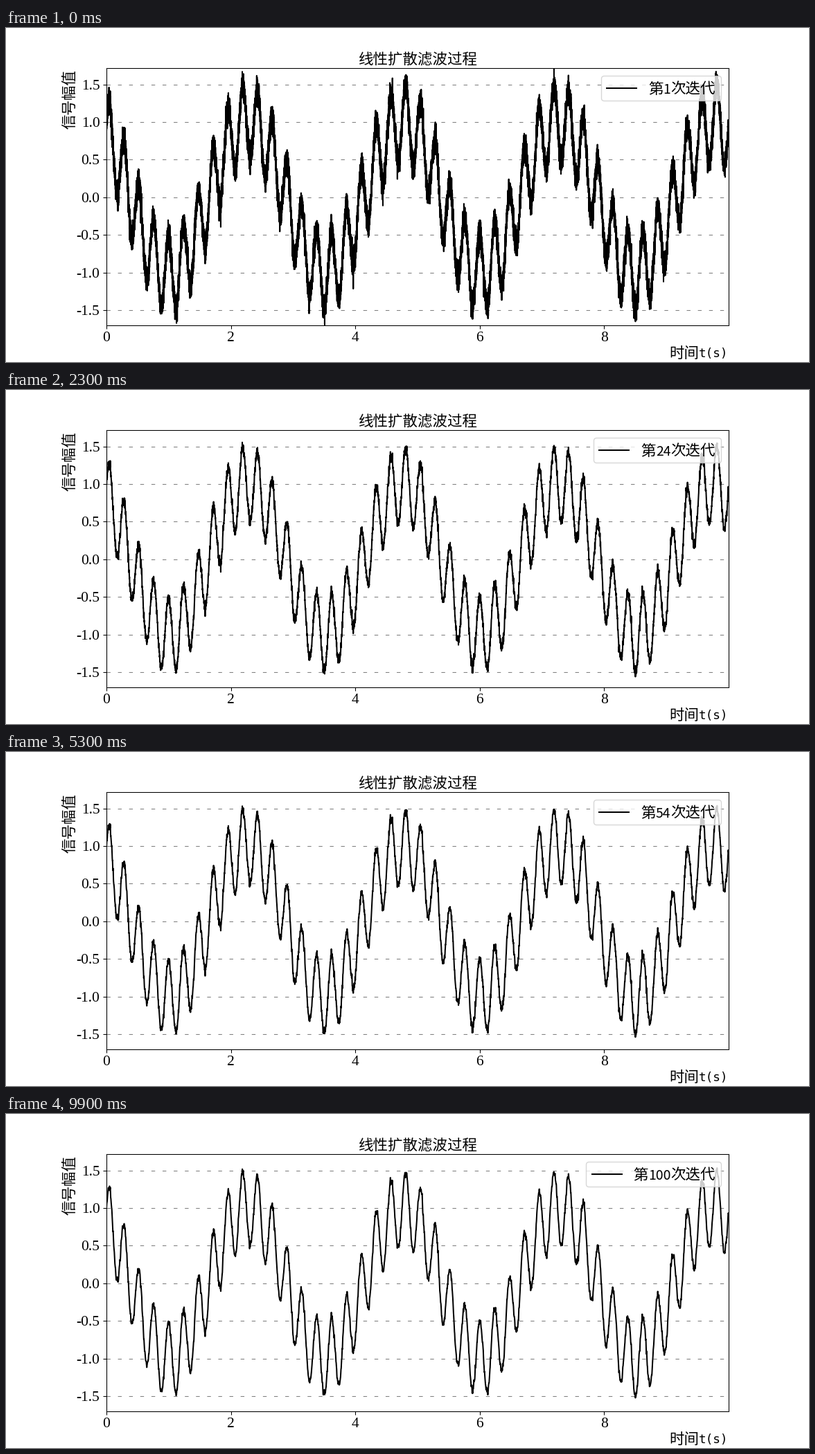
These frames come from a looping animation (1159x483 px, 10 s). A matplotlib script:

```python
import matplotlib.pyplot as plt
import numpy as np
from matplotlib.animation import FuncAnimation
from matplotlib.lines import Line2D
from matplotlib.patches import FancyBboxPatch
from matplotlib.transforms import Affine2D

W, H, DPI = 1159, 483, 100
K = W / 1200              # a 12 by 5 inch layout scaled to the stage
PT = 16 * K               # font size in points
EM = PT * DPI / 72        # font size in pixels
DIGIT = EM / 2
HAN = "Noto Sans CJK JP"

STEPS = 100
RATE = 0.1                # diffusion coefficient per iteration
NOISE = 0.1

plt.rcParams.update({
    "font.family": "Liberation Serif",
    "font.size": PT,
    "axes.unicode_minus": False,
    "axes.linewidth": 0.8 * K,
    "xtick.major.size": 3.5 * K,
    "ytick.major.size": 3.5 * K,
    "xtick.major.pad": 3.5 * K,
    "ytick.major.pad": 3.5 * K,
    "xtick.major.width": 0.8 * K,
    "ytick.major.width": 0.8 * K,
})


def diffuse(u):
    """One explicit diffusion step with zero-flux ends."""
    p = np.pad(u, 1, mode="edge")
    return u + RATE * (p[2:] - 2 * u + p[:-2])


def make_signals():
    t = np.arange(0, 10, 0.0005)
    slow = np.cos(0.8 * np.pi * (t - 2.27))
    fast = 0.5 * np.cos(8.4 * np.pi * t - 0.4 * np.pi)
    u = slow + fast + np.random.default_rng(4).normal(0, NOISE, t.size)
    signals = []
    for _ in range(STEPS):
        u = diffuse(u)
        signals.append(u)
    return t, signals


t, signals = make_signals()

fig, ax = plt.subplots(figsize=(W / DPI, H / DPI), dpi=DPI, facecolor="white")
ax.set_xlim(0, t[-1])
ax.set_ylim(-1.701, 1.717)
ax.set_xticks(range(0, 10, 2))
ax.set_yticks(np.arange(-1.5, 1.6, 0.5))
ax.grid(axis="y", color="gray", linestyle=(0, (5, 10)), linewidth=0.8 * K)
curve, = ax.plot(t, signals[0], color="black", lw=1.5 * K)

# Pixel coordinates with the origin at the top left
px = Affine2D().scale(1 / W, -1 / H).translate(0, 1) + fig.transFigure


def label(x, y, text, size=PT, font=HAN, **kw):
    return fig.text(x, y, text, transform=px, fontsize=size, family=font,
                    color="black", va="baseline", **kw)


label(594.5, 51, "线性扩散滤波过程", ha="center")
label(99, 145.5, "信号幅值", ha="left", rotation=90, rotation_mode="anchor")
label(1043 - 2 * EM, 477, "时间", ha="right")
label(1043 - 2 * EM, 476, "t(s)", size=PT * 0.83, font="DejaVu Sans Mono",
      ha="left")

# Legend, right-aligned and growing leftwards with the counter
RIGHT, TOP = 1043.1 - EM / 2, 58 + EM / 2
TEXT_END = RIGHT - 0.4 * EM
TAIL = TEXT_END - 3 * EM
box = FancyBboxPatch((859, TOP), 174, 1.7 * EM,
                     boxstyle=f"round,pad=0,rounding_size={0.2 * EM}",
                     facecolor="white", edgecolor="0.8", linewidth=K,
                     alpha=0.8, transform=px, snap=True, zorder=1)
handle = Line2D([867, 910], [87, 87], color="black", lw=1.5 * K,
                transform=px, zorder=2)
fig.add_artist(box)
fig.add_artist(handle)
label(TEXT_END, 95, "次迭代", ha="right")
head = label(TAIL, 95, "第", ha="right")
count = label(TAIL, 95, "1", size=0.9 * PT, ha="center")


def update(i):
    curve.set_ydata(signals[i])
    number = str(i + 1)
    width = DIGIT * len(number)
    left = TAIL - width - 4.2 * EM
    box.set_x(left)
    box.set_width(RIGHT - left)
    handle.set_xdata([left + 0.4 * EM, left + 2.4 * EM])
    head.set_x(TAIL - width)
    count.set_x(TAIL - width / 2)
    count.set_text(number)
    return curve, box, handle, head, count


anim = FuncAnimation(fig, update, frames=STEPS, interval=100,
                     repeat=True, repeat_delay=0, blit=False)
plt.show()
```
